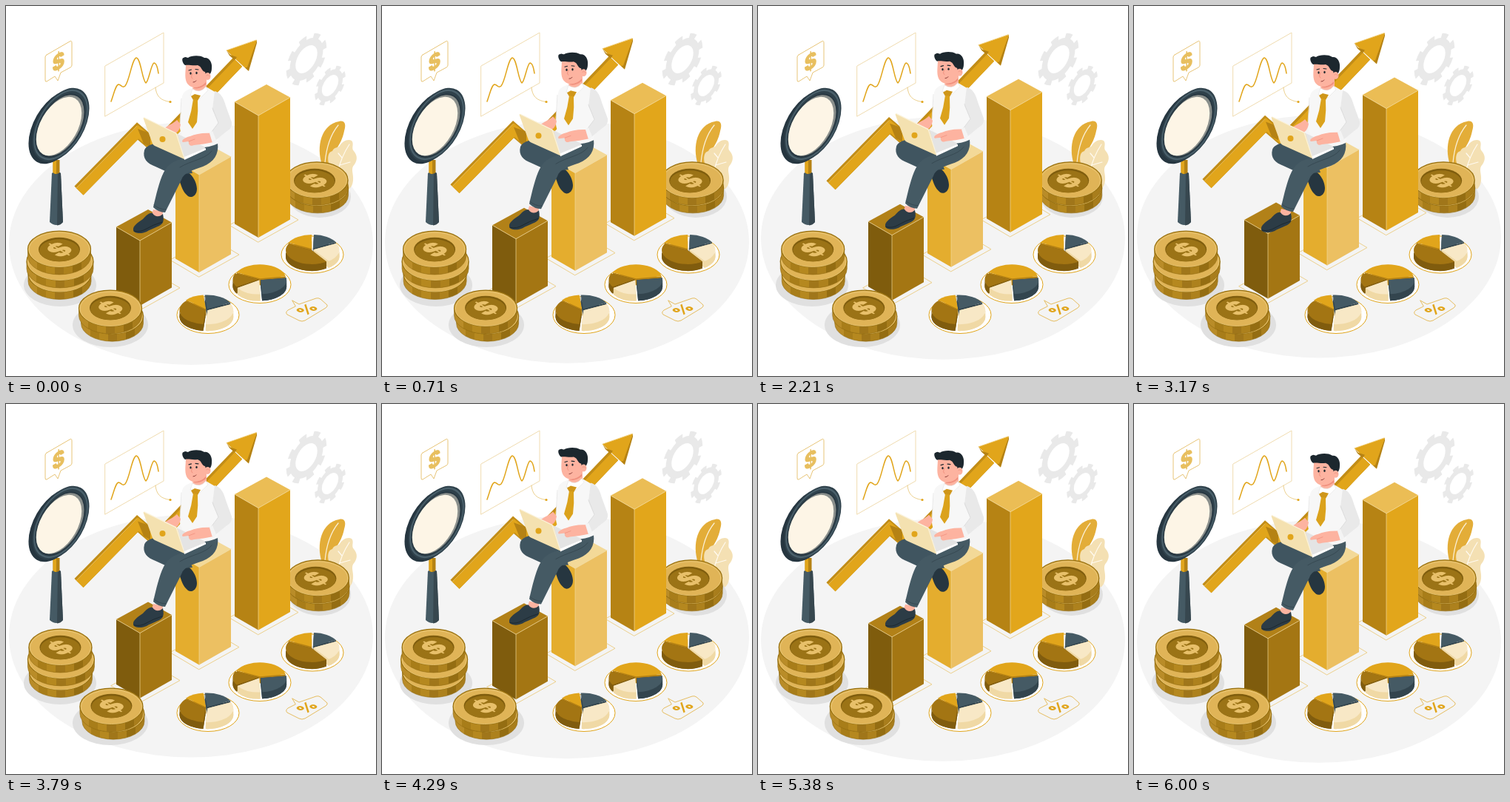
These frames come from a looping animation (500 by 500 pixels, 6040 ms). An HTML page:

```html
<!DOCTYPE html>
<html lang="en">
<head>
<meta charset="utf-8">
<title>Growth</title>
<style>
html, body { margin: 0; width: 100%; height: 100%; overflow: hidden; background: #fff; }
svg { display: block; width: 100vw; height: 100vh; }
text { font-family: Inter, Roboto, sans-serif; font-weight: 900; text-anchor: middle; }
</style>
</head>
<body>
<svg id="stage" viewBox="0 0 500 500"></svg>
<script>
const GOLD = '#e1a51b', DARK = '#b58214', CREAM = '#f8e8c6',
  SLATE = '#455a64', INK = '#263640', SKIN = '#fdb3a0', BLUSH = '#f0917f', LINE = '#ecd08d';
const LOOP = 6040;

const path = (d, fill, more = '') => `<path d="${d}" fill="${fill}" ${more}/>`;
const line = (d, color, width = 1, join = 'round') =>
  path(d, 'none', `stroke="${color}" stroke-width="${width}" stroke-linecap="${join === 'round' ? 'round' : 'butt'}" stroke-linejoin="${join}"`);
const oval = (x, y, rx, ry, fill, more = '') =>
  `<ellipse cx="${x}" cy="${y}" rx="${rx}" ry="${ry}" fill="${fill}" ${more}/>`;
const group = (cls, body) => `<g class="${cls}">${body}</g>`;
// Isometric planes: a wall facing left and the floor
const wall = (x, y, body) => `<g transform="matrix(.866 -.5 0 1 ${x} ${y})">${body}</g>`;
const floor = (x, y, body) => `<g transform="matrix(.866 -.5 .866 .5 ${x} ${y})">${body}</g>`;
const glyph = (s, size, color) => `<text y="${size * .36}" font-size="${size}" fill="${color}">${s}</text>`;
const disc = (r, fill) => `<circle r="${r}" fill="${fill}"/>`;

function gear(x, y, k) {
  const half = Math.PI * 28 / 8;
  return wall(x, y, `<g transform="scale(${k})" fill="none" stroke="#e9e9e9">
    <circle r="21.5" stroke-width="9"/>
    <circle r="28" stroke-width="7" stroke-dasharray="${half}" stroke-dashoffset="${half}"/></g>`);
}

function bar(x, y, h, [left, right, top]) {
  const fx = x + 32, fy = y + 18.5, rx = x + 75, ry = y - 6;
  return line(`M${fx} ${fy + h + 6}L${fx + 54} ${fy + h - 24}L${fx + 15} ${fy + h - 47}L${fx - 39} ${fy + h - 17}Z`, LINE)
    + path(`M${x} ${y}L${fx} ${fy}V${fy + h}L${x} ${y + h}Z`, left)
    + path(`M${fx} ${fy}L${rx} ${ry}V${ry + h}L${fx} ${fy + h}Z`, right)
    + path(`M${x} ${y}L${x + 43} ${y - 23.5}L${rx} ${ry}L${fx} ${fy}Z`, top)
    + line(`M${x} ${y}L${fx} ${fy}L${rx} ${ry}M${fx} ${fy}V${fy + h}`, '#f3d999', .7);
}

function coin(x, y, r, h = 10) {
  const ry = r * .575;
  return path(`M${x - r} ${y}V${y + h}A${r} ${ry} 0 0 0 ${x + r} ${y + h}V${y}Z`, 'url(#rim)', 'stroke="#916b10" stroke-width=".6"')
    + oval(x, y, r, ry, '#e0b457', 'stroke="#97700f" stroke-width="1.2"')
    + oval(x, y + .8, r - 1.5, ry - 1.2, 'none', 'stroke="#edcb7c" stroke-width=".8"');
}

function face(x, y) {
  return oval(x, y, 28, 16.3, '#7f5d0d') + oval(x, y + 1.3, 27, 15, '#9b7316')
    + floor(x, y, glyph('$', 35, '#e8c06a'));
}

// Slices are [from, to, top colour, side colour], degrees clockwise from the right
function pie(x, y, slices) {
  const at = (a, cx, cy, drop = 0) => {
    const r = a * Math.PI / 180;
    return `${(cx + 35 * Math.cos(r)).toFixed(1)} ${(cy + 19 * Math.sin(r) + drop).toFixed(1)}`;
  };
  const depth = ([a, b]) => Math.sin((a + b) * Math.PI / 360);
  return [...slices].sort((p, q) => depth(p) - depth(q)).map(([a, b, top, side]) => {
    const mid = (a + b) * Math.PI / 360, cx = x + 1.6 * Math.cos(mid), cy = y + 1.2 * Math.sin(mid);
    const wedge = d => `M${cx} ${cy + d}L${at(a, cx, cy, d)}A35 19 0 0 1 ${at(b, cx, cy, d)}Z`;
    const wallAt = e => `M${cx} ${cy}V${cy + 9}L${at(e, cx, cy, 9)}L${at(e, cx, cy)}Z`;
    let body = path(wedge(9), side) + path(wallAt(a), side) + path(wallAt(b), side);
    const s = Math.max(a, 0), e = Math.min(b, 180);
    if (s < e) body += path(`M${at(s, cx, cy)}A35 19 0 0 1 ${at(e, cx, cy)}L${at(e, cx, cy, 9)}A35 19 0 0 0 ${at(s, cx, cy, 9)}Z`, side);
    return body + path(wedge(0), top);
  }).join('');
}
const ring = (x, y) => oval(x, y, 42, 25, '#fff', `stroke="${GOLD}" stroke-width="1"`);

const slate = [SLATE, '#33454e'], cream = [CREAM, '#f0d9a5'], brown = ['#a37513', '#805c0e'], gold = [GOLD, DARK];

const magnifier =
  path('M62 226Q68 221 74 226L77 292Q68 300 59 292Z', SLATE)
  + path('M70 223.500L74 226L77 292Q74 296 69 296.500Z', '#37474f')
  + path('M63.500 208H72.500V225Q68 229 63.500 225Z', DARK) + path('M63.500 208H68V227Q65 227 63.500 225Z', GOLD)
  + wall(69, 163.5, disc(44.5, INK))
  + wall(74, 160.5, disc(44.5, '#2f414b') + '<circle r="41.5" fill="none" stroke="#4b616c" stroke-width="2"/>')
  + wall(73.5, 161.5, disc(38.5, INK) + disc(37, '#8a8f8c'))
  + wall(71.5, 162.5, disc(35.5, '#fdf5e6'));

const notes =
  line('M55 66L86 48Q89 46 89 50V80Q89 82 87 83L74 90L70 101L66 95L55 102Q53 103 53 100V69Q53 67 55 66Z', '#e8c578')
  + wall(71, 75, glyph('$', 30, '#e8bf5f'))
  + line('M134 81L213 36V104L134 149Z', '#f0dcb0')
  + line('M142 129C146 118 148 107 152 106C156 106 157 112 161 108C167 101 170 72 176 70C182 70 184 100 189 104C193 102 196 78 200 77C203 77 205 84 206 91', GOLD, 1.5)
  + line('M202 110C203 122 209 128 222 129.500', LINE) + oval(222, 129.5, 1.6, 1.6, GOLD);

const percent =
  line('M387 398L396 403L419 395Q422 394 425 396L434 404Q435 406 432 408L404 425Q400 427 396 425L380 417Q377 414 381 411L391 406Z', '#e6bd60')
  + floor(406.5, 410, glyph('%', 22, GOLD));

const leaves =
  path('M427 214C419 190 426 160 450 156C458 154 460 160 457 169C453 190 440 198 436 214Z', '#e3ad38')
  + line('M431 212C433 190 440 172 449 161', '#fbf0d6', 1.2)
  + path('M437 216C433 204 436 197 441 196C444 190 448 192 451 189C454 183 462 179 467 182C471 186 466 192 470 196C475 202 475 208 471 214C465 220 470 226 469 236C468 246 462 250 456 250Z', '#f4e0b3')
  + line('M448 225C452 208 458 196 464 187M451 215L465 211M454 205L449 199', '#fffaf0', 1.2);

const arrowLine = 'M98.500 249.500L177.500 169L203 191L313 76';
const arrow =
  line(arrowLine, '#c28d17', 17, 'miter')
  + `<g transform="translate(1.2 1.2)">${line(arrowLine, GOLD, 13.5, 'miter')}</g>`
  + path('M178 166L195 172V191L186 186Z', DARK)
  + line('M95 246L177 162', '#efc766', .8)
  + path('M298 60L339 46L327 87L319 80L307 69Z', GOLD)
  + path('M298 60L303 66L312 69L309 73L302 67ZM339 46V50L328 88L323 83L326 83Z', DARK)
  + line('M298 60L338 46', '#efc766', .8);

const legs =
  path('M238 223C250 222 258 238 258 247C258 257 250 260 246 257C239 251 238 246 235 238Z', INK)
  + path('M250 186C225 183 192 182 187 195C184 206 191 213 202 217L226 228L252 226L246 210Z', '#405560')
  + path('M199 275L212 278L211 288L196 285Z', SKIN)
  + path('M172 303C171 297 178 293 185 288C190 283 193 279 198 280C202 286 208 285 212 281Q214 290 211 294C206 299 198 300 190 305C184 308 173 308 172 303Z', '#2c3c46')
  + line('M173 304Q182 306 190 301Q198 296 211 292', '#1c2930')
  + path('M247 193L286 185C288 200 281 211 266 217C252 222 240 225 237 235L215 279Q206 279 199 272C203 255 207 237 213 225C220 211 232 207 247 205Z', SLATE)
  + line('M200 269Q207 275 216 275', '#33454e', .8)
  + line('M278 196C270 207 249 209 235 218', '#34464f', .8);

const torso =
  path('M252 111C246 113 239 115 238 123L235 159C234 170 239 178 245 184L246 190Q270 194 286 186L292 124C287 118 277 113 270 109Z', '#f7f7f7')
  + path('M282 115C290 117 294 124 297 135L305 157C306 164 302 167 296 171L279 185L275 174L287 158L279 140Z', '#e9e9e9')
  + line('M279 138L287 158L275 174', '#d9d9d9', .8)
  + line('M237 125L235 159', '#e3e3e3', .8)
  + path('M253 103L271 97L271 112C266 119 257 119 252 114Z', SKIN)
  + path('M254 109Q263 111 270 103L270 106Q262 113 254 111Z', BLUSH)
  + path('M252 112L249 121L256 121L262 125L273 114L270 109Q262 119 252 112Z', '#fff', 'stroke="#e2e2e2" stroke-width=".6"')
  + path('M250 122L255 119L263 121L259 128L253 127Z', '#cf961a')
  + path('M253 126L259 127Q260 142 258 157L252 166L246 157Q251 142 253 126Z', '#dba21c');

const head =
  path('M243 78C243 87 241 96 244 103C248 111 257 112 264 107C271 103 275 95 273 84L264 76Z', SKIN)
  + path('M242 80C238 77 237 70 240 70C243 68 244 70 246 70C250 67 262 66 268 70C275 69 279 77 278 84C278 90 275 94 271 96L269 89C264 88 265 82 259 80C252 81 247 79 242 80Z', '#1c272e')
  + oval(272.5, 95, 4, 5, SKIN) + line('M271 94Q274 92 275 95', BLUSH, .7)
  + oval(249.5, 91, 1.2, 1.7, '#1c272e') + oval(257.5, 90.5, 1.2, 1.7, '#1c272e')
  + line('M247 87L250.500 86M256 85.500L260 86', '#1c272e', 1.1)
  + line('M252 91Q249 97 252 98', BLUSH) + line('M253 103Q256 103 257 101', '#8e3f3a');

const laptop =
  path('M213 166C219 161 226 159 231 154L236 160C235 168 231 172 226 173Z', SKIN)
  + path('M230 172L268 190L270 194L241 207Z', '#e4e4e4')
  + path('M241 204L270 192V194.500L241 208Z', '#fff')
  + path('M187 151Q185 150 186 153L198 186Q199 188 201 189L241 207L232 174Q231 172 229 171Z', '#f4e1b0')
  + line('M187 151L230 172L241 206', '#fbf3dc', 1.2)
  + oval(211.5, 180, 4, 4, GOLD)
  + path('M278 172C266 171 256 173 249 176C241 178 236 182 239 184L247 183C246 188 250 190 254 188C262 187 272 186 280 184Z', SKIN)
  + line('M247 183L255 180', BLUSH, .8)
  + path('M275 172L279 185L284 181L279 169Z', '#f4f4f4');

const facets = ['#b98c28', '#a87d19', '#b5881f', '#a0761a', '#ad811d', '#946d12', '#a87d1c'];
const stops = facets.map((c, i) => [i, i + 1].map(n =>
  `<stop offset="${n / facets.length}" stop-color="${c}"/>`).join('')).join('');

document.getElementById('stage').innerHTML =
  `<defs><linearGradient id="rim">${stops}</linearGradient></defs>`
  + group('rise', oval(250, 321, 246, 164, '#f4f4f4'))
  + gear(406, 72, 1) + gear(438, 107.5, .76)
  + notes + leaves
  + oval(73, 377, 49, 29, '#e0e0e0') + oval(141, 431, 51, 30, '#e0e0e0') + oval(424, 258, 42, 28, '#e0e0e0')
  + group('sway', coin(421, 246, 41.5) + coin(420, 235, 42) + face(417, 236))
  + group('rise', arrow)
  + magnifier
  + group('rise', bar(309, 129.5, 165, ['#b68314', '#e2a61b', '#ebbd55'])
    + bar(229, 209.5, 132, ['#e4ad2e', '#ecc062', '#f3d998'])
    + bar(149, 298.5, 88, ['#7f5c0d', '#a47613', '#b28118']))
  + group('bob', legs + torso + head + laptop)
  + group('sway', coin(72.5, 362, 42.5) + coin(73, 345, 45) + coin(72, 328.5, 42.5) + face(72, 329)
    + coin(143.5, 419, 42) + coin(141, 408.5, 42.5) + face(141, 408))
  + ring(273, 417.5) + pie(271, 410.5, [[-95, -26, ...slate], [-25, 94, ...cream], [95, 219, ...brown], [220, 264, ...gold]])
  + ring(343, 376.5) + pie(343, 369.5, [[-8, 87, ...slate], [88, 147, ...cream], [148, 205, ...brown], [206, 351, ...gold]])
  + ring(414, 336) + pie(414, 329, [[-88, -28, ...slate], [-27, 54, ...cream], [55, 205, ...brown], [206, 270, ...gold]])
  + percent;

const move = (cls, x, y) => document.querySelectorAll('.' + cls)
  .forEach(g => g.setAttribute('transform', `translate(${x} ${y})`));
const triangle = p => 1 - Math.abs(1 - 2 * (p % 1));

const start = performance.now();
function draw() {
  const p = (performance.now() - start) % LOOP / LOOP;
  move('rise', 0, -10 * triangle(p));
  move('bob', 0, -10 * triangle(2 * p));
  move('sway', 3.6 * Math.sin(Math.PI * p) * Math.cos(2 * Math.PI * (5 * p + .04)), 0);
  requestAnimationFrame(draw);
}
draw();
</script>
</body>
</html>
```
